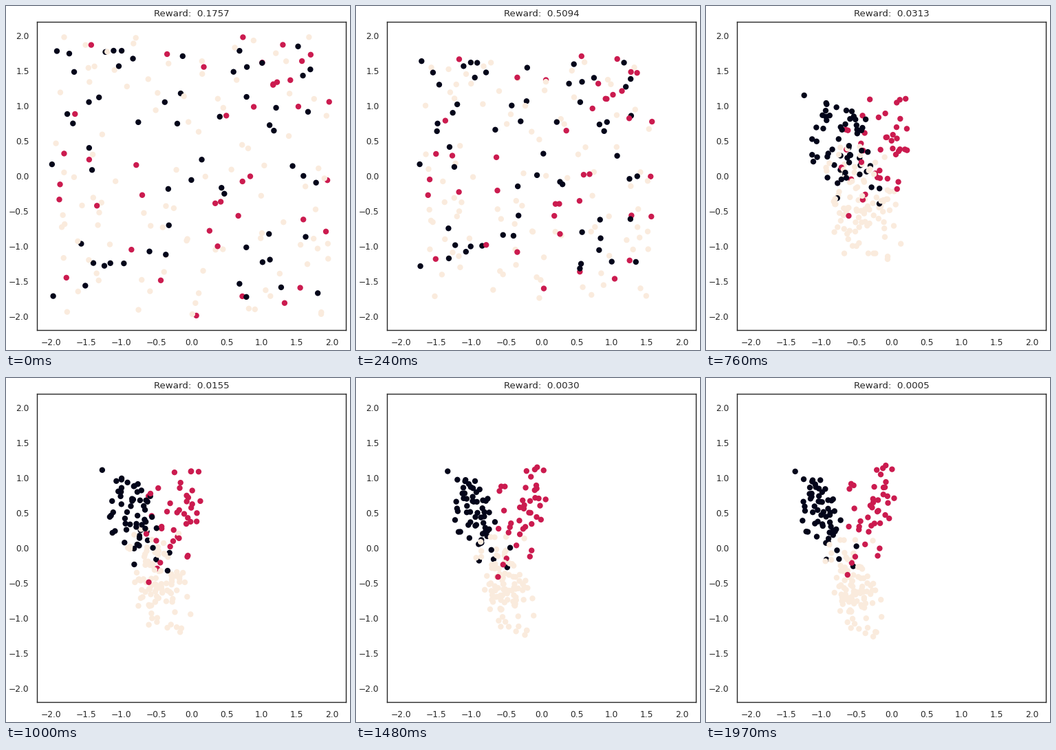
A matplotlib script for the animation above (2000 ms loop, 500 by 500 pixels).

```python
import numpy as np
import matplotlib.pyplot as plt
from matplotlib.animation import FuncAnimation

SIZE, DPI = 500, 100
STEPS, LOOP, TICK = 66, 2000, 10
LEFT, RIGHT, TOP, BOTTOM = 45.3, 494.3, 23, 471
LIM = 2.2
INK = "#262626"

plt.rcParams["font.family"] = "DejaVu Sans"
rng = np.random.default_rng(12)


def make_group(count, color, center, height, lean, width, drift):
    """Scatter points over the square and give each a place in a leaning cluster."""
    start = rng.uniform(-2, 2, (count, 2))
    # a place in the cluster depends partly on where the point began
    u, v = (0.5 * start + 0.85 * rng.normal(size=(count, 2))).T
    dy = height * np.clip(v, -2.2, 2.2)
    dx = lean * dy + width * np.clip(u, -2.4, 2.4)
    end = np.array(center) + np.column_stack([dx, dy])
    return start, end, np.full(count, color), np.tile(drift, (count, 1))


# drift: how far a cluster first lies toward the others before they part
groups = [
    make_group(60, "#03051A", (-0.98, 0.45), 0.32, -0.38, 0.13, (0.88, -0.1)),
    make_group(41, "#CB1B4F", (-0.32, 0.48), 0.39, 0.30, 0.16, (0.2, -0.5)),
    make_group(99, "#FAEBDD", (-0.52, -0.58), 0.31, -0.17, 0.15, (0.2, 0.6)),
]
start, end, color, drift = (np.concatenate(part) for part in zip(*groups))
order = rng.permutation(len(start))
start, end, color, drift = (a[order] for a in (start, end, color, drift))

REWARD_AT = [0, 8, 16, 25, 33, 49, 65]
REWARD = [0.1757, 0.5094, 0.1068, 0.0313, 0.0155, 0.0030, 0.0005]


def positions(k):
    spread = 1 / (1 + (k / 13) ** 3)
    fade = np.exp(-k / 20) - np.exp(-(STEPS - 1) / 20)
    return spread * start + (1 - spread) * (end + drift * fade)


def reward(k):
    return np.exp(np.interp(k, REWARD_AT, np.log(REWARD)))


fig = plt.figure(figsize=(SIZE / DPI, SIZE / DPI), dpi=DPI, facecolor="white")
ax = fig.add_axes([LEFT / SIZE, 1 - BOTTOM / SIZE,
                   (RIGHT - LEFT) / SIZE, (BOTTOM - TOP) / SIZE])
ticks = np.arange(-2, 2.1, 0.5)
ax.set(xlim=(-LIM, LIM), ylim=(-LIM, LIM), xticks=ticks, yticks=ticks)
ax.tick_params(length=4.8, pad=3.5, left=False, bottom=False,
               labelsize=8.8, labelcolor=INK)
for spine in ax.spines.values():
    spine.set(color=INK, linewidth=1)
title = ax.set_title("", fontsize=9.6, color=INK, pad=6)
dots = ax.scatter(*start.T, s=4.8 ** 2, c=color, linewidths=1.2,
                  edgecolors="face")


def draw(i):
    # 66 even steps, their starts rounded to the 10 ms tick
    k = (i * TICK + TICK // 2) * STEPS // LOOP
    dots.set_offsets(positions(k))
    title.set_text(f"Reward:  {reward(k):.4f}")
    return dots, title


anim = FuncAnimation(fig, draw, frames=LOOP // TICK, interval=TICK,
                     repeat=True, repeat_delay=0, blit=False)
plt.show()
```
